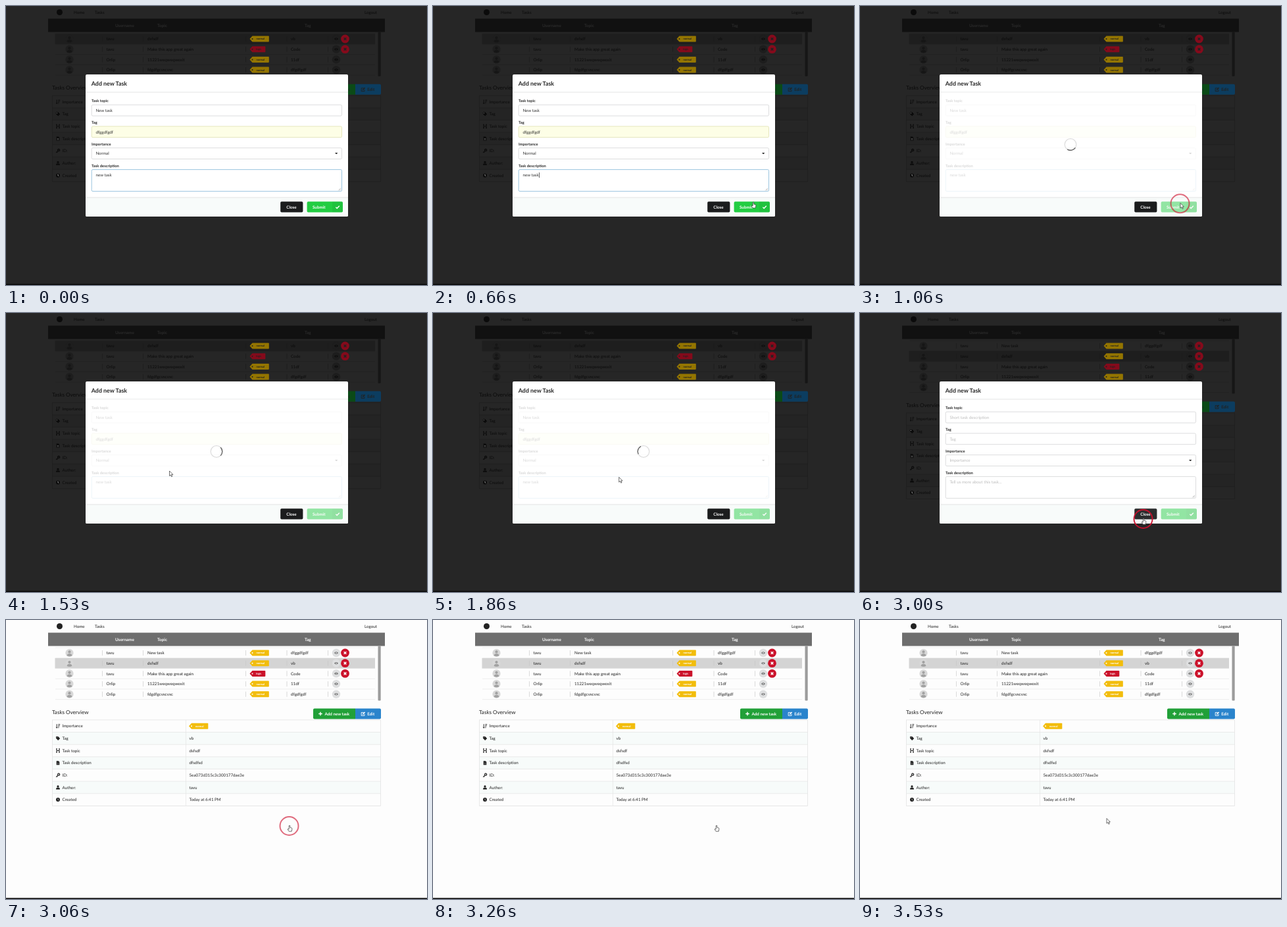
Animation of 640 by 424 pixels, one loop 3600 ms. Source, as an HTML page:

```html
<!DOCTYPE html>
<html lang="en">
<head>
<meta charset="utf-8">
<title>Task dialog</title>
<style>
html, body { margin: 0; width: 100%; height: 100%; overflow: hidden; background: #fdfdfd; }
svg { display: block; width: 640px; height: 424px; }
text { font-family: Lato, "Open Sans", sans-serif; text-rendering: geometricPrecision; white-space: pre; }
</style>
</head>
<body>
<svg id="stage" viewBox="0 0 640 424" xmlns="http://www.w3.org/2000/svg"></svg>
<script>
const LOOP = 3600, FPS = 15, ROW = 15.7;
const stage = document.getElementById('stage');

// Moments of the story, in ms
const SHOW = 400, PRESS = 930, SEND = 1060, SAVED = 2000, PRESS2 = 2930, CLOSE = 3060, LEAVE = 3330;

const light = {
  bg: '#fdfdfd', ink: '#222', head: '#6e6e6e', headInk: '#fff', sel: '#d4d4d4', stripe: '#f7fbfa',
  line: '#e3e3e3', tick: '#c4c4c4', bar: '#9c9c9c', pic: '#d8d8d8', face: '#a2a2a2', eye: '#dedfe0',
  eyeInk: '#666', yellow: '#f2bd0c', red: '#cb122b', green: '#21a038', blue: '#2a84cc', on: '#fff'
};
const dark = {
  bg: '#262626', ink: '#0b0b0b', head: '#111', headInk: '#2b2b2b', sel: '#1e1e1e', stripe: '#242424',
  line: '#1f1f1f', tick: '#1a1a1a', bar: '#161616', pic: '#1e1e1e', face: '#161616', eye: '#1d1d1d',
  eyeInk: '#0c0c0c', yellow: '#947500', red: '#850a1b', green: '#0b4a17', blue: '#0c3d60', on: '#222'
};

const rect = (x, y, w, h, fill, more = '') => `<rect x="${x}" y="${y}" width="${w}" height="${h}" fill="${fill}" ${more}/>`;
const dot = (x, y, r, fill, more = '') => `<circle cx="${x}" cy="${y}" r="${r}" fill="${fill}" ${more}/>`;
const path = (d, fill, more = '') => `<path d="${d}" fill="${fill}" ${more}/>`;
const line = (d, color, w = 1, more = '') => path(d, 'none', `stroke="${color}" stroke-width="${w}" ${more}`);
const at = (x, y, body) => `<g transform="translate(${x} ${y})">${body}</g>`;
// y is the middle of the line
const text = (x, y, str, fill, size = 6.25, more = '') =>
  `<text x="${x}" y="${y + size * .36}" font-size="${size}" fill="${fill}" ${more}>${str}</text>`;
const bold = (x, y, str, fill, size = 6.25, more = '') => text(x, y, str, fill, size, 'font-weight="700" ' + more);

const check = (x, y) => at(x, y, line('M-2.6 .2L-.8 2L2.8 -1.8', '#fff', 1.4));

function label(x, y, kind, p) {
  const high = kind === 'high', w = high ? 23 : 28.5;
  return at(x, y, path(`M0 0L4 -4.5H${w}Q${w + .8} -4.5 ${w + .8} -3.7V3.7Q${w + .8} 4.5 ${w} 4.5H4Z`, high ? p.red : p.yellow) +
    dot(4, 0, 1, p.on) + bold(w / 2 + 2, 0, kind, p.on, 4, 'text-anchor="middle"'));
}

function avatar(y, p) {
  return at(96.5, y, dot(0, 0, 6.1, p.pic) + dot(0, -1.6, 2.1, p.face) +
    path('M-3.9 4.2C-3.9 0 3.9 0 3.9 4.2Q0 6.3 -3.9 4.2Z', p.face));
}

function eyeButton(y, p) {
  return at(502, y, dot(0, 0, 6.2, p.eye) + path('M-3 0Q0 -3.6 3 0Q0 3.6 -3 0Z', p.eyeInk) +
    dot(0, 0, 1.2, p.eye) + dot(0, 0, .6, p.eyeInk));
}

const deleteButton = (y, p) =>
  at(515.5, y, dot(0, 0, 6.4, p.red) + line('M-1.8 -1.8L1.8 1.8M1.8 -1.8L-1.8 1.8', p.on, 1.5));

const tasks = [
  ['tavu', 'New task', 'normal', 'dfggdfgdf', 1],
  ['tavu', 'dsfsdf', 'normal', 'vb', 1],
  ['tavu', 'Make this app great again', 'high', 'Code', 1],
  ['Orlip', '11221weqweqwexit', 'normal', '11df', 0],
  ['Orlip', 'fdgdfgcvxcvxc', 'normal', 'dfgdfgdf', 0]
];

function taskRow([user, topic, kind, tag, own], i, chosen, p) {
  const y = 50 + i * ROW;
  let s = chosen ? rect(74.5, y - 7.8, 486.5, ROW, p.sel) : '';
  s += line(`M75 ${y + 7.9}H561`, p.line, .6);
  for (const x of [146.5, 208.5, 364.5, 427, 489.5]) s += line(`M${x} ${y - 4}v8`, p.tick, .6);
  s += avatar(y, p) + text(152.5, y, user, p.ink) + text(215, y, topic, p.ink) +
    label(370.5, y, kind, p) + text(433, y, tag, p.ink) + eyeButton(y, p);
  return s + (own ? deleteButton(y, p) : '');
}

const icons = [
  c => line('M-1.8 -3V3M-3 1.6L-1.8 3L-.6 1.6M.4 -2.5H3.2M.4 -.8H2.6M.4 .9H2M.4 2.6H1.4', c, .9),
  c => path('M-3 -2.8H.2L3.2 .2L.2 3.2L-3 0Z', c) + dot(-1.6, -1.4, .6, '#fff', 'opacity=".6"'),
  c => line('M-2 -2.6V2.6M2 -2.6V2.6M-2 0H2M-3 -2.6h2M1 -2.6h2M-3 2.6h2M1 2.6h2', c, 1),
  c => path('M-2.3 -3H.8L2.3 -1.5V3H-2.3Z', c) + line('M-1.2 .2H1.2M-1.2 1.6H1.2', '#fff', .5, 'opacity=".6"'),
  c => dot(1.1, -1.1, 1.5, 'none', `stroke="${c}" stroke-width="1.3"`) + line('M0 0L-2.8 2.8M-1.6 1.6L-.6 2.6', c, 1.2),
  c => dot(0, -1.5, 1.6, c) + path('M-2.9 3V2Q-2.9 .4 -1 .4H1Q2.9 .4 2.9 2V3Z', c),
  c => dot(0, 0, 3, c) + line('M0 -1.8V.2L1.2 1', '#fff', .7, 'opacity=".8"')
];

const details = [
  ['Importance', ''], ['Tag', 'vb'], ['Task topic', 'dsfsdf'], ['Task description', 'dfsdfsd'],
  ['ID:', '5ea073d315c3c300177dae3e'], ['Author:', 'tavu'], ['Created', 'Today at 6:41 PM']
];

function overview(p) {
  const h = 18.65;
  let s = text(70, 140, 'Tasks Overview', p.ink, 8.1);
  s += path('M469 134.5H531V150.5H469Q467 150.5 467 148.5V136.5Q467 134.5 469 134.5Z', p.green);
  s += path('M531 134.5H568Q570 134.5 570 136.5V148.5Q570 150.5 568 150.5H531Z', p.blue);
  s += line('M475.2 142.5h5.6M478 139.7v5.6', p.on, 1.4) + bold(484.5, 142.5, 'Add new task', p.on);
  s += at(543, 142.5, line('M.8 -2H-2.8V2.8H2V.4', p.on, .9) + line('M-.8 .9L2.6 -2.6', p.on, 1.5));
  s += bold(549.3, 142.5, 'Edit', p.on);
  details.forEach(([name, value], i) => {
    const y = 161.2 + i * h;
    if (i % 2) s += rect(70.5, y - h / 2, 499, h, p.stripe);
    if (i) s += line(`M70.5 ${y - h / 2}H569.5`, p.line, .7);
    s += at(79, y, icons[i](p.ink)) + text(85.5, y, name, p.ink) + text(278.5, y, value, p.ink);
  });
  s += label(278, 161.2, 'normal', p) + line('M273.5 152V282', p.line, .6);
  return s + rect(70.5, 151.9, 499, 7 * h, 'none', `stroke="${p.line}" stroke-width=".8"`);
}

function page(p, list, chosen) {
  const extra = (list.length - 5) * ROW;
  let s = rect(0, 0, 640, 424, p.bg) + dot(81.5, 9.5, 4.5, p.ink);
  s += text(103, 9.7, 'Home', p.ink) + text(135, 9.7, 'Tasks', p.ink) + text(545, 9.7, 'Logout', p.ink);
  s += rect(64, 19.3, 512, 20.2, p.head);
  [[166, 'Username'], [230, 'Topic'], [454, 'Tag']].forEach(([x, str]) => s += bold(x, 29.5, str, p.headInk, 6.4));
  s += line('M75 42H561', p.line, .6);
  list.forEach((row, i) => s += taskRow(row, i, i === chosen, p));
  s += rect(565.5, 39.5, 4.2, 83 + extra, p.bar, 'rx="1"');
  return s + at(0, extra, overview(p)) + rect(0, 422.4, 640, 1.6, '#0a0a0a');
}

function field(y, h, name, value, ink, fill = '#fff', edge = '#d9dadb') {
  return bold(130, y - 14.3, name, '#2a2a2a', 5.8) +
    rect(130.2, y - 8.4, 380.3, h, fill, `rx="1.8" stroke="${edge}" stroke-width=".9"`) + text(136.4, y, value, ink);
}

function form(filled) {
  const ink = filled ? '#333' : '#bdbdbd';
  const pick = (a, b) => filled ? a : b;
  return field(158.6, 16.8, 'Task topic', pick('New task', 'Short task description'), ink) +
    field(191.3, 16.8, 'Tag', pick('dfggdfgdf', 'Tag'), ink, pick('#fdfee6', '#fff'), pick('#e2e4b8', '#d9dadb')) +
    field(224.1, 16.8, 'Importance', pick('Normal', 'Importance'), ink) +
    path('M500 222.9h4.4l-2.2 2.4Z', '#222') +
    field(257, 33, 'Task description', pick('new task', 'Tell us more about this task...'), ink, '#fff', pick('#8fbfdc', '#d9dadb')) +
    line('M505.5 280.3l3.4 -3.4M507.4 280.3l1.5 -1.5', '#888', .6);
}

const layer = (id, body) => `<g id="${id}">${body}</g>`;
const arrow = path('M0 0V7.6L1.8 6L3 8.8L4.3 8.2L3.1 5.5H5.4Z', '#fff', 'stroke="#333" stroke-width=".7"');
const hand = path('M-.8 .4Q0 -.6 .8 .4V3.2L3.3 3.9Q4.1 4.2 3.9 5.2L3.2 9H-.8L-3 5.8Q-2.8 4.6 -.8 5.8Z', '#fff', 'stroke="#333" stroke-width=".7"');

stage.innerHTML =
  layer('before', page(dark, tasks.slice(1), 0)) +
  layer('after', page(dark, tasks, 1)) +
  layer('plain', page(light, tasks, 1)) +
  layer('modal',
    rect(121, 104, 399, 216, '#fff', 'rx="2"') +
    bold(129.8, 117.4, 'Add new Task', '#262626', 8.9) + line('M121 131H520', '#dcdddd', .8) +
    layer('full', form(true)) + layer('empty', form(false)) +
    layer('caret', rect(161.3, 253, .7, 8, '#222')) +
    layer('wait', rect(121.5, 131.5, 398, 159, '#fff', 'opacity=".82"') +
      dot(320, 210.5, 8.8, 'none', 'stroke="#dedede" stroke-width="1.3"') +
      layer('spin', line('M0 -8.8A8.8 8.8 0 0 1 8.8 0', '#666', 1.4))) +
    path('M121 291H520V318Q520 320 518 320H123Q121 320 121 318Z', '#f8fbfa') + line('M121 291H520', '#dcdddd', .8) +
    rect(417.2, 297.3, 34.2, 16.3, '#1b1c1d', 'id="shut" rx="1.8"') + bold(426.3, 305.5, 'Close', '#fff') +
    layer('submit', rect(457.6, 297.3, 54.4, 16.3, '#22cd42', 'rx="1.8"') +
      path('M496 297.3H510.2Q512 297.3 512 299.1V311.8Q512 313.6 510.2 313.6H496Z', '#000', 'opacity=".05"') +
      bold(466, 305.5, 'Submit', '#fff') + check(504, 305.5))) +
  dot(0, 0, 14, 'none', 'id="ring" stroke="#cc0f2c" stroke-width="2"') +
  layer('pointer', layer('arrow', arrow) + layer('hand', hand));

const el = {};
stage.querySelectorAll('[id]').forEach(n => el[n.id] = n);
const show = (id, yes) => { el[id].style.display = yes ? '' : 'none'; };
const move = (id, x, y, turn = 0) => el[id].setAttribute('transform', `translate(${x} ${y}) rotate(${turn})`);

// Pointer tip: time, x, y
const route = [
  [SHOW, 425, 264], [660, 487, 298], [860, 487, 299.5], [1130, 487, 299.5], [1530, 248.5, 240],
  [SAVED, 292, 252], [2260, 292, 252], [2400, 296.5, 253.5], [2730, 431, 312.2], [LEAVE - 66, 431, 312.2], [3530, 375, 301.5]
];

function pointerAt(t) {
  const i = route.findIndex(k => k[0] > t);
  if (i < 0) return route[route.length - 1].slice(1);
  if (i === 0) return route[0].slice(1);
  const [t0, x0, y0] = route[i - 1], [t1, x1, y1] = route[i];
  const u = (t - t0) / (t1 - t0), e = u * u * (3 - 2 * u);
  return [x0 + (x1 - x0) * e, y0 + (y1 - y0) * e];
}

function ringAlpha(t, press) {
  const age = t - press;
  if (age < 0 || age > 300) return 0;
  return age < 100 ? .92 : Math.max(0, .92 * (300 - age) / 255);
}

function draw(t) {
  const open = t < CLOSE, saved = t >= SAVED, sent = t >= SEND;
  show('before', open && !saved);
  show('after', open && saved);
  show('plain', !open);
  show('modal', open);
  show('full', !saved);
  show('empty', saved);
  show('caret', t >= 530 && !sent);
  show('wait', sent && !saved);
  move('spin', 320, 210.5, 45 + (t - 1530) * .6);
  el.submit.setAttribute('opacity', sent ? .47 : 1);

  const [x, y] = pointerAt(t);
  const inRow = y > 297 && y < 314;
  const onSubmit = inRow && x > 457 && x < 512 && !sent;
  const onClose = inRow && x > 417 && x < 452 && saved;
  const asHand = onSubmit || onClose && t < LEAVE;
  show('pointer', t >= SHOW);
  show('hand', asHand);
  show('arrow', !asHand);
  move('pointer', x, y);
  el.shut.setAttribute('fill', onClose ? '#2b2d2e' : '#1b1c1d');

  const alpha = Math.max(ringAlpha(t, PRESS), ringAlpha(t, PRESS2));
  el.ring.setAttribute('opacity', alpha);
  move('ring', x - .5, y + .8);
}

const start = performance.now();
function tick(now) {
  const t = Math.max(0, now - start) % LOOP;
  const step = Math.floor((t + 9) * FPS / 1000);
  draw(Math.floor(step * 100 / FPS) * 10 % LOOP);
  requestAnimationFrame(tick);
}
draw(0);
requestAnimationFrame(tick);
</script>
</body>
</html>
```
